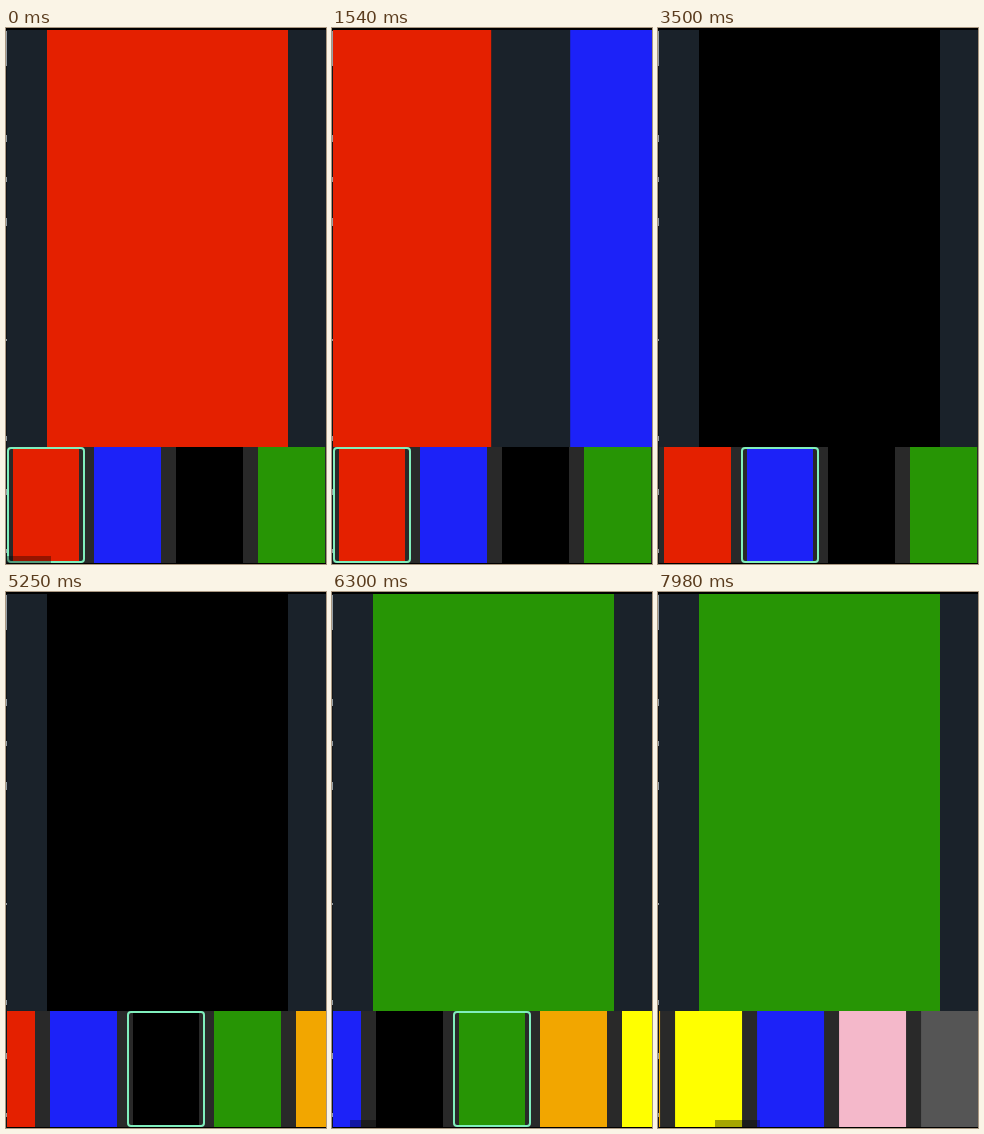
Recreate the animation shown at these times as an HTML page. Size 320 by 536 pixels, loop 8000 ms.

```html
<!DOCTYPE html>
<html lang="en">
<head>
<meta charset="utf-8">
<title>Colour gallery</title>
<style>
  :root {
    --red: #e42000; --blue: #1c22f8; --black: #000; --green: #279505;
    --orange: #f2a600; --yellow: #ff0; --pink: #f4b8ca; --grey: #555;
  }
  html, body { margin: 0; width: 100%; height: 100%; overflow: hidden; background: #000; }
  #stage { position: relative; width: 320px; height: 536px; overflow: hidden; background: #000; }
  #stage div { position: absolute; }
  .move { animation: 8s linear infinite; }

  #viewer { left: 0; top: 2px; width: 320px; height: 417px; overflow: hidden; background: #1a222a; }
  #pages { left: 0; top: 0; height: 417px; animation-name: pages; }
  .page { top: 0; width: 241px; height: 417px; }

  #tray { left: 0; top: 419px; width: 320px; height: 116px; overflow: hidden; background: #292929; }
  #strip { left: 0; top: 0; height: 116px; animation-name: strip; }
  .thumb { top: 0; width: 67.5px; height: 116px; }

  #ring {
    left: 1px; top: 0; width: 77.5px; height: 116px; box-sizing: border-box;
    border: 2px solid #80efbd; border-radius: 4px; background: #292929;
    box-shadow: 0 0 0 1px #292929;
    animation-name: ring; animation-timing-function: step-end;
  }
  #fill {
    left: 4px; top: 0; width: 65.5px; height: 112px;
    animation-name: fill; animation-timing-function: step-end;
  }
  #bar { left: 0; top: 109px; width: 45px; height: 7px; background: #000; animation-name: bar, fade; }

  /* sliver of the window behind, at the left edge */
  #edge { left: 0; top: 2px; width: 1px; height: 534px; background: #11161b; }
  #edge div { left: 0; width: 1px; background: #98a0a6; }

  @keyframes pages {
    0%, 16.125% { transform: none; animation-timing-function: cubic-bezier(.5, 0, .8, .7); }
    19.25% { transform: translateX(-121px); animation-timing-function: cubic-bezier(.15, .6, .3, 1); }
    24.75%, 35% { transform: translateX(-320px); animation-timing-function: cubic-bezier(.4, 0, .15, 1); }
    43.5%, 67% { transform: translateX(-640px); animation-timing-function: cubic-bezier(.4, 0, .15, 1); }
    74.5%, 100% { transform: translateX(-960px); }
  }
  @keyframes strip {
    0%, 48.125% { transform: none; animation-timing-function: ease-in-out; }
    53%, 75% { transform: translateX(-44px); animation-timing-function: ease-in-out; }
    78.5%, 84% { transform: translateX(-126px); animation-timing-function: cubic-bezier(.35, .1, .3, 1); }
    100% { transform: translateX(-399px); }
  }
  @keyframes bar {
    0%, 48.125% { transform: none; animation-timing-function: ease-in-out; }
    53%, 75% { transform: translateX(6.3px); animation-timing-function: ease-in-out; }
    78.5%, 84% { transform: translateX(18px); animation-timing-function: cubic-bezier(.35, .1, .3, 1); }
    100% { transform: translateX(57px); }
  }
  @keyframes fade {
    0%, 5% { opacity: .35; }
    9%, 26.24% { opacity: 0; }
    26.25%, 33% { opacity: .35; }
    37%, 48.12% { opacity: 0; }
    48.125%, 55.5% { opacity: .35; }
    60%, 74.99% { opacity: 0; }
    75%, 100% { opacity: .35; }
  }
  @keyframes ring {
    0% { transform: none; }
    26.25% { transform: translateX(82px); }
    48.125% { transform: translateX(164px); }
    75%, 100% { transform: translateX(246px); }
  }
  @keyframes fill {
    0% { background: var(--red); }
    26.25% { background: var(--blue); }
    48.125% { background: var(--black); }
    75%, 100% { background: var(--green); }
  }
</style>
</head>
<body>
<div id="stage">
  <div id="viewer"><div id="pages" class="move"></div></div>
  <div id="tray">
    <div id="strip" class="move"></div>
    <div id="bar" class="move"></div>
  </div>
  <div id="edge"></div>
</div>
<script>
  const colors = ['red', 'blue', 'black', 'green', 'orange', 'yellow', 'blue', 'pink', 'grey'];
  const $ = id => document.getElementById(id);

  function add(parent, props, style) {
    const el = Object.assign(document.createElement('div'), props);
    Object.assign(el.style, style);
    return parent.appendChild(el);
  }

  colors.forEach((name, i) => {
    const background = `var(--${name})`;
    if (i < 4) add($('pages'), { className: 'page' }, { left: 40.5 + 320 * i + 'px', background });
    add($('strip'), { className: 'thumb' }, { left: 5.7 + 82 * i + 'px', background });
  });

  const ring = add($('strip'), { id: 'ring', className: 'move' });
  add(ring, { id: 'fill', className: 'move' });

  // [top, height] of the light marks
  [[1, 35], [105, 7], [147, 5], [188, 8], [309, 2], [406, 5], [459, 6], [519, 4]]
    .forEach(([top, height]) => add($('edge'), {}, { top: top + 'px', height: height + 'px' }));
</script>
</body>
</html>
```
